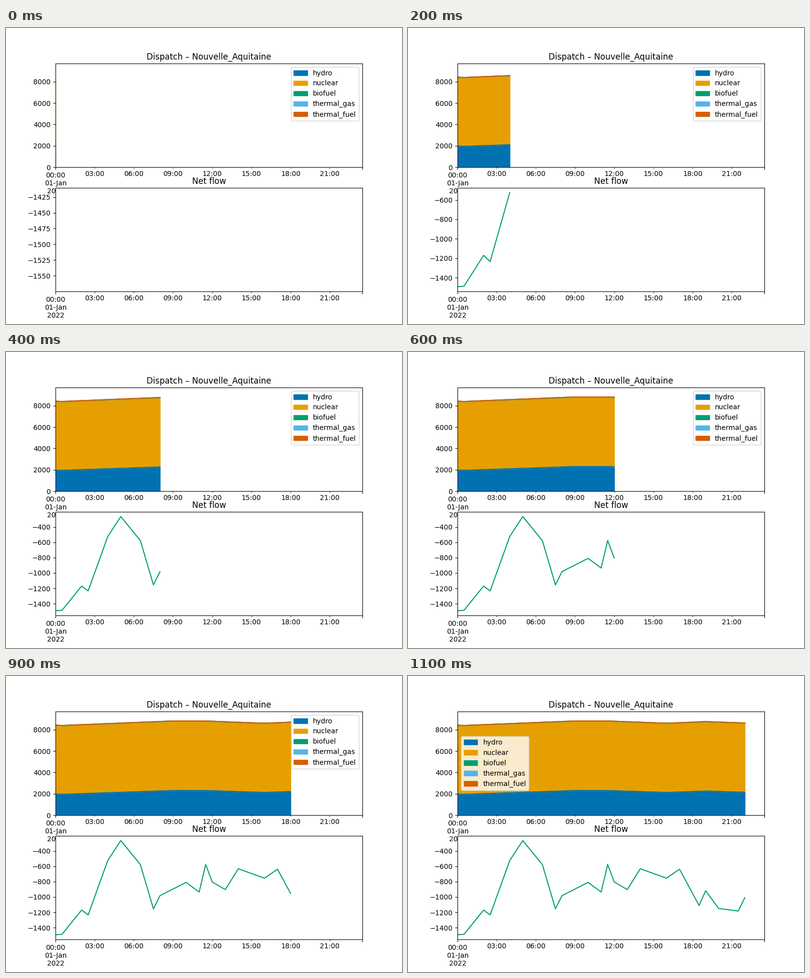
These frames come from a looping animation (800x600 px, 1.2 s). A matplotlib script:

```python
import numpy as np
import matplotlib.pyplot as plt
from matplotlib.animation import FuncAnimation

FRAMES, INTERVAL = 12, 100
STEPS = 4  # half-hour samples added per frame
END = 23.5
COLORS = {
    "hydro": "#0072B2",
    "nuclear": "#E69F00",
    "biofuel": "#009E73",
    "thermal_gas": "#56B4E9",
    "thermal_fuel": "#D55E00",
}

hours = np.arange(0, 22.5, 0.5)


def ramps(*points):
    """Straight ramps through (hour, value) turning points."""
    return np.interp(hours, *zip(*points))


# Hydro ramps up and down; nuclear follows it weakly on a flat base
hydro = ramps((0, 1975), (0.5, 1950), (9, 2305), (11.5, 2303),
              (16, 2125), (19, 2255), (22, 2145))
nuclear = 6435 + 0.19 * (hydro - hydro.min())
biofuel = np.full_like(hours, 20)
idle = np.zeros_like(hours)
dispatch = dict(zip(COLORS, [hydro, nuclear, biofuel, idle, idle]))
peak = sum(dispatch.values()).max()

net_flow = ramps(
    (0, -1492.61), (0.5, -1487), (2, -1170), (2.5, -1234), (4, -524),
    (5, -262.6), (6.5, -577), (7.5, -1155), (8, -982), (10, -809),
    (11, -935), (11.5, -575), (12, -804), (13, -903), (14, -631),
    (16, -754), (17, -637), (18.5, -1111), (19, -918), (20, -1150),
    (21.5, -1183), (22, -1008),
)

fig, (top, bottom) = plt.subplots(2, 1, figsize=(8, 6), dpi=100)


def time_axis(ax):
    ax.set_xlim(0, END)
    ax.set_xticks([0, END], ["00:00\n01-Jan\n2022", ""])
    marks = range(3, 24, 3)
    ax.set_xticks(marks, [f"{h:02d}:00" for h in marks], minor=True)


def draw_dispatch(n, loc):
    top.clear()
    x, base, areas = hours[:n], np.zeros(n), []
    for name, values in dispatch.items():
        color, upper = COLORS[name], base + values[:n]
        top.plot(x, upper, color=color)
        areas.append(top.fill_between(x, base, upper, color=color))
        base = upper
    time_axis(top)
    top.set_ylim(0, 1.1 * peak)
    top.set_title("Dispatch – Nouvelle_Aquitaine")
    top.legend(areas, list(COLORS), loc=loc)


def draw_flow(n):
    bottom.clear()
    bottom.plot(hours[:n], net_flow[:n], color=COLORS["biofuel"])
    time_axis(bottom)
    bottom.set_title("Net flow")


def update(i):
    n = STEPS * i + 1
    # The legend jumps aside once the areas reach it
    draw_dispatch(n, "upper right" if hours[n - 1] <= 18 else "center left")
    draw_flow(n)
    return []


anim = FuncAnimation(fig, update, frames=FRAMES, interval=INTERVAL,
                     init_func=lambda: [], repeat=True, repeat_delay=0)
plt.show()
```
